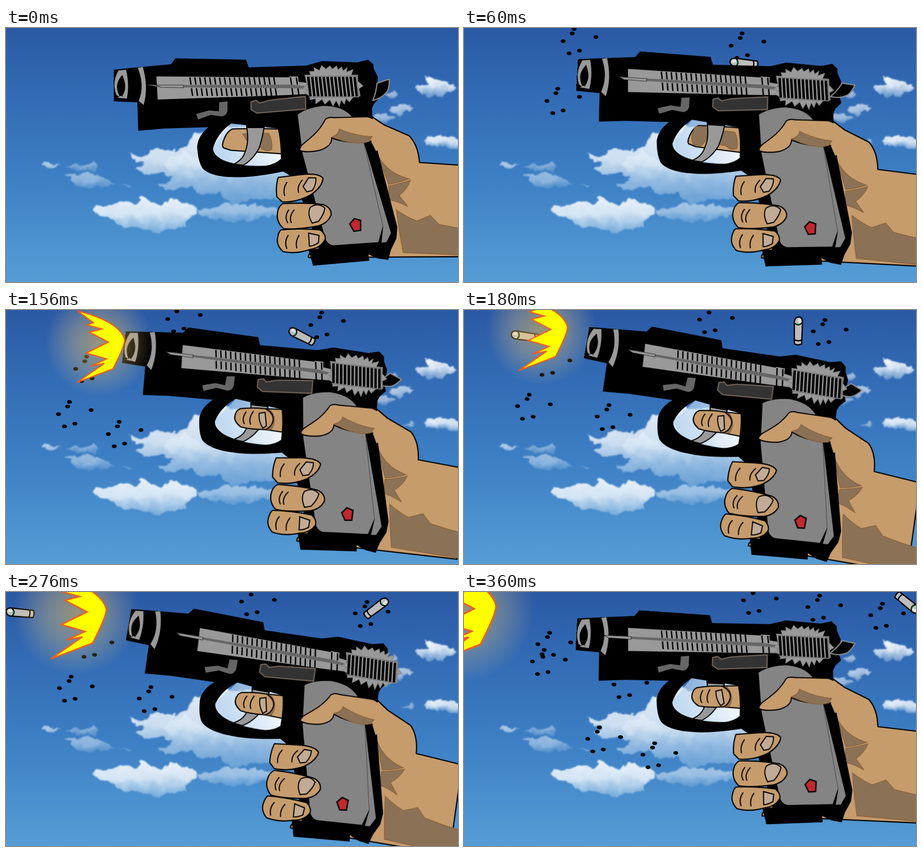
An HTML page for the animation above (0.42 s loop, 998 by 561 pixels).

```html
<!DOCTYPE html>
<html lang="en">
<head>
<meta charset="utf-8">
<title>Recoil loop</title>
<style>
  html, body { margin: 0; width: 100%; height: 100%; overflow: hidden; background: #3c7cc2; }
  svg { display: block; width: 100vw; height: 100vh; }
  .skin { fill: #c69c6d; stroke: #000; stroke-width: 2.6; stroke-linejoin: round; }
  .shade { fill: #8b7257; stroke: #8c6239; stroke-width: 1.8; }
  .nail { fill: #c1ab96; stroke: #000; stroke-width: 2.4; }
  .crease { fill: none; stroke: #000; stroke-width: 2.4; stroke-linecap: round; }
  .metal { fill: #999; }
</style>
</head>
<body>
<svg viewBox="0 0 998 561" preserveAspectRatio="none">
  <defs>
    <linearGradient id="sky" x1="0" y1="0" x2="0" y2="1">
      <stop offset="0" stop-color="#2b59a4"/>
      <stop offset=".25" stop-color="#326ab4"/>
      <stop offset=".6" stop-color="#3d80c5"/>
      <stop offset="1" stop-color="#569dd5"/>
    </linearGradient>
    <linearGradient id="puff" x1="0" y1="0" x2="0" y2="1">
      <stop offset="0" stop-color="#fff" stop-opacity=".95"/>
      <stop offset=".45" stop-color="#f4f9fd" stop-opacity=".85"/>
      <stop offset="1" stop-color="#a9cdea" stop-opacity=".4"/>
    </linearGradient>
    <linearGradient id="haze">
      <stop offset="0" stop-color="#a9cdee" stop-opacity=".6"/>
      <stop offset="1" stop-color="#fff" stop-opacity=".75"/>
    </linearGradient>
    <radialGradient id="glow">
      <stop offset="0" stop-color="#ffc84a" stop-opacity=".5"/>
      <stop offset=".5" stop-color="#ffd070" stop-opacity=".3"/>
      <stop offset="1" stop-color="#ffd890" stop-opacity="0"/>
    </radialGradient>
    <filter id="fluff" x="-10%" y="-20%" width="120%" height="140%">
      <feTurbulence type="fractalNoise" baseFrequency=".045" numOctaves="3" seed="4"/>
      <feDisplacementMap in="SourceGraphic" scale="22" xChannelSelector="R" yChannelSelector="G"/>
      <feGaussianBlur stdDeviation="1.8"/>
    </filter>
    <g id="casing" stroke="#000" stroke-width="2.8" stroke-linejoin="round">
      <path fill="#bdbdbd" d="M-31-1Q-30-9-20-9L29-8Q33 0 29 8L-20 9Q-30 8-31-1Z"/>
      <path fill="#e4e4e4" stroke="none" d="M-26-5L-15-6-16-1-27 1Z"/>
      <path fill="none" d="M-18-8Q-9 0-17 8M20-8Q24 0 20 8"/>
      <path fill="none" stroke="#18a05a" stroke-width="2" d="M-17-5Q-13 0-16 5"/>
    </g>
  </defs>

  <rect width="998" height="561" fill="url(#sky)"/>
  <g id="clouds" fill="url(#puff)" filter="url(#fluff)"></g>
  <g id="dots"></g>
  <use id="shell" href="#casing"/>

  <g id="gun">
    <path class="skin" d="M668 502L815 250 808 196 Q822 205 835 214L890 238Q910 258 913 297L1017 304 1024 505 668 507Z"/>
    <path class="shade" d="M817 272Q837 320 890 333Q864 343 845 345Z"/>
    <path class="shade" d="M845 349Q870 344 893 336Q886 356 868 370L887 394Q866 383 845 379Z"/>
    <path class="shade" d="M862 402Q888 420 907 426L937 414 956 434 998 442 1060 450V503L998 501 877 496Q868 450 862 402Z"/>

    <path fill="url(#haze)" d="M497 211L603 222 610 295 575 306 480 294 455 266Z"/>
    <g id="restFinger">
      <path class="skin" d="M640 280L538 273 496 270 481 265Q475 262 481 247 487 229 500 223 540 221 640 224Z"/>
      <path class="shade" d="M523 234L562 232 580 233Q589 248 587 268 575 276 562 264L540 262Z"/>
    </g>
    <path id="fingerTipShade" class="shade" d="M497 226Q512 222 523 228 527 255 510 268L495 266Q484 250 497 226Z"/>
    <path class="metal" stroke="#000" stroke-width="2.4" d="M531 216L570 218Q567 240 559 265 546 290 524 303L502 301Q524 291 529 270 537 250 531 216Z"/>
    <path d="M533 212L572 213 569 221 532 221Z"/>
    <g id="pullFinger" transform="translate(771 435)rotate(-6.8)translate(-753 -451)">
      <path class="skin" d="M640 272L606 269 572 264Q540 264 518 258 504 247 505 236 507 222 517 218 545 215 573 218L640 221Z"/>
      <path class="shade" stroke="none" d="M577 222Q594 235 588 252L575 264 586 264Q600 242 584 221Z"/>
      <path class="nail" d="M559 228L572 226 575 256 567 261Q557 245 559 228Z"/>
      <path class="crease" d="M530 225Q520 240 526 251M546 224Q535 240 540 252M573 218Q592 228 590 243 586 260 572 264"/>
    </g>

    <path fill-rule="evenodd" d="M238 92L288 87 364 80 374 67 530 70 536 87 663 83 698 73 775 76 799 70 811 80 812 90 821 108 819 140 824 155 812 168 808 178 809 200 815 250 864 440 862 465 850 490 844 512 821 509 800 500 802 514 678 525 668 490 690 487 662 400 632 329 612 317Q570 326 530 329 455 333 434 310 424 295 422 262 424 238 447 219L350 222 292 227 290 164 238 162Z
      M497 211Q466 233 457 266 458 281 480 292 520 308 575 304 596 300 607 289 607 250 600 222L536 215Z"/>
    <path fill="#848484" d="M644 191Q665 176 700 172 747 172 767 200L789 250 832 438 822 473 722 480Q709 477 705 465L655 278Z"/>
    <path fill="#848484" d="M829 474L833 437 850 453 840 473Z"/>
    <path fill="#848484" d="M790 252L850 453 833 440Z"/>
    <path fill="#c1272d" stroke="#000" stroke-width="3" d="M759 433L769 421 783 425 783 447 768 449Z"/>

    <path class="metal" d="M248 94L265 92Q273 125 267 156L246 154 255 149Q266 128 257 104 236 125 252 153L244 148Q233 122 248 94Z"/>
    <path d="M256 104Q270 129 257 150L259 153 249 145Q240 126 256 104Z"/>
    <path class="metal" d="M291 88L302 86Q315 130 304 170L293 161Q307 128 291 88Z"/>
    <path fill="#666" d="M420 190L448 182 470 184 471 164 489 162 489 183Q486 196 474 195L452 192 424 202Z"/>
    <path fill="#333" stroke="#736357" stroke-width="2.6" d="M541 163L552 160 560 166 580 160 604 157 661 151 662 179 554 188 541 180Z"/>

    <g id="hammer">
      <path stroke="#8c8c8c" stroke-width="2.6" stroke-linejoin="round" d="M846 113L819 122Q818 140 810 160 832 155 843 138 847 126 846 113Z"/>
    </g>
    <g id="slide">
      <path class="metal" d="M332 107L625 109 626 107 645 107 646 119 664 121 664 146 600 149 335 158Z"/>
      <path id="slots" stroke="#000" stroke-width="3"/>
      <path fill="#666" d="M310 125L340 126 632 125 664 129 664 134 630 133 340 131Z"/>
      <path fill="#999" stroke="#848484" stroke-width="1.5" d="M660 104L673 104 670 96 681 96 680 88 692 94 697 83 706 91 715 84 720 91 730 84 733 93 741 86 744 95 753 88 751 98 766 92 762 104 776 104 777 118 788 128 779 134 782 150 766 153 758 163 751 155 747 168 740 158 736 173 729 160 722 172 715 158 704 168 698 157 684 167 684 156 671 158 673 150 659 144 666 136 655 134 665 126Z"/>
      <path fill="#999" stroke="#777" stroke-width="2" d="M664 107L774 106 779 152 670 153Z"/>
      <path id="grooves" stroke="#000" stroke-width="5.4"/>
    </g>
    <path id="rod" fill="#999" stroke="#222" stroke-width="1.2" d="M331 126L392 126 392 132 342 131Z"/>

    <path class="skin" stroke="none" style="stroke:none" d="M795 197L820 205 838 260 817 272 806 250Z"/>
    <path class="skin" style="stroke:none" d="M648 268C655 250 690 230 705 202Q711 196 725 198L795 196 812 202 816 240 806 250Q760 256 720 243 720 261 693 270 665 276 650 271Z"/>
    <path class="crease" d="M806 250Q760 258 719 243 720 261 693 270 665 276 650 271 646 268 654 258C675 240 692 228 705 202Q711 196 725 198L795 196 808 196 Q822 206 835 214"/>
    <path class="shade" d="M736 223Q770 238 808 240L802 250Q785 257 758 252 736 248 720 240 734 236 736 223Z"/>

    <path class="skin" d="M601 330L650 324Q690 319 700 332 698 352 672 369 640 386 610 384L598 373Q595 350 601 330Z"/>
    <path class="nail" d="M668 331L656 350 664 362 676 359Q686 345 684 331Z"/>
    <path class="skin" d="M611 388Q660 385 700 390 718 396 718 412 712 430 690 437 640 446 613 443 598 430 599 412 600 395 611 388Z"/>
    <path class="nail" d="M672 396Q690 384 704 398 702 412 690 427L676 431Q664 410 672 396Z"/>
    <path class="skin" d="M607 446Q650 442 694 446 706 455 705 466 696 485 672 489 640 500 612 494 596 480 600 462 602 450 607 446Z"/>
    <path class="nail" d="M668 453L691 458 690 474Q680 481 670 482Z"/>
    <path class="crease" d="M620 341Q611 355 615 370M654 336Q642 350 646 363M624 402Q614 417 622 430M636 402Q624 417 630 430M623 458Q614 472 620 487M647 458Q638 472 642 486"/>
  </g>

  <use id="bullet" href="#casing"/>
  <g id="flash">
    <circle cx="205" cy="72" r="120" fill="url(#glow)"/>
    <path fill="#ff0" stroke="#f15a24" stroke-width="2.6" d="M158 2Q252 26 262 66 262 80 236 130L157 160 217 118 187 124 222 108 177 95 226 71 184 49 212 42 179 33 193 28Z"/>
  </g>
</svg>
<script>
const STEP = 60;
const PIVOT = [771, 435], HAMMER_TIP = [846, 113], FLASH_ROOT = [236, 130];
const $ = id => document.getElementById(id);

// gun: x, y of the pivot and turn; slide and rod: shift along the barrel;
// hammer: tip and turn; shell and bullet: x, y, turn; flash: x, y, scale
const poses = [
  { gun: [771, 435, 0], slide: 0, rod: 0, hammer: [846, 113, 0] },
  { gun: [764, 442, 3.3], slide: 17.5, rod: 0, hammer: [851.6, 114, 24], shell: [618, 78, 6],
    dots: [614, 12, 243, 2, 207, 134] },
  { gun: [753, 451, 6.8], slide: 34.5, rod: 0, hammer: [855, 125, 40], shell: [653, 58, 27], flash: [236, 130, 1],
    dots: [697, 6, 381, -7, 178, 103, 140, 203, 250, 247] },
  { gun: [742, 468, 10], slide: 34, rod: 0, hammer: [855, 125, 40], shell: [738, 46, 91], flash: [202, 103, 1.02],
    bullet: [135, 58, 8], spin: 4, dots: [797, 22, 546, -4, 187, 90, 144, 187, 320, 210] },
  { gun: [742, 468, 10], slide: 62.5, rod: 13, shell: [818, 35, 143], flash: [191, 113, 1.17],
    bullet: [31, 46, 5], spin: 4, dots: [797, 22, 546, -4, 187, 90, 144, 187, 320, 210] },
  { gun: [752, 449, 6.7], slide: 18, rod: -33, hammer: [853, 121, 37], shell: [901, -5, 200], flash: [89, 114, 1.34],
    spin: 4, dots: [711, 4, 850, 21, 569, -11, 189, 90, 177, 128, 284, 175, 225, 295, 348, 330] },
  { gun: [765, 428, 2.9], slide: 19, rod: -33, hammer: [853, 116, 28], shell: [979, 24, 219], flash: [36, 116, 1.34],
    spin: 4, dots: [785, 8, 924, 26, 643, -7, 189, 90, 177, 128, 357, 179, 299, 299, 421, 334] }
];
const cluster = [[0, 0], [-4, 10], [-24, 27], [48, 18], [-11, 54], [12, 48]];

const clouds = [
  ["270 275 302 280 328 264 365 272 398 262 422 236 470 215 600 222 640 300 640 380 560 378 500 388 468 366 430 372 402 352 350 360 336 342 366 336 340 322 310 327 286 310 302 300 276 290", .92],
  ["340 300 400 270 440 300 520 290 500 340 440 330 400 335", .35],
  ["190 392 232 393 255 383 288 390 300 373 335 386 378 378 420 396 426 410 402 424 396 442 350 444 330 458 292 440 242 436 226 415 202 408", .95],
  ["422 402 470 394 500 387 560 394 610 402 610 414 540 424 502 430 440 416", .55],
  ["130 328 190 321 245 346 200 353 160 352", .5],
  ["130 304 165 302 190 294 202 314 170 317", .45],
  ["80 297 100 297 116 304 95 309", .65],
  ["258 345 268 343 279 349", .5],
  ["902 132 926 124 930 107 952 118 986 126 994 135 962 150 936 154 914 140", 1],
  ["840 142 860 138 864 150 846 156", .6],
  ["846 180 866 170 897 176 870 194", .7],
  ["808 192 840 186 859 202 825 212", .6],
  ["920 252 942 236 975 241 1004 248 1004 264 960 267", .95],
  ["866 253 900 246 906 256", .5]
];
$("clouds").innerHTML = clouds.map(([points, opacity]) =>
  `<polygon points="${points}" opacity="${opacity}"/>`).join("");

const strokes = (count, draw) => Array.from({ length: count }, (_, i) => draw(i)).join("");
const slot = x => `M${x} 109l2.5 16M${x + 3.5} 133l2.5 17`;
$("slots").setAttribute("d", strokes(18, i => slot(406 + i * 10.9)) + slot(628) + slot(641));
$("grooves").setAttribute("d", strokes(13, i => `M${667.5 + i * 8.5} 108l5 43`));

function place(id, pose, origin = [0, 0], scale = 1) {
  const el = $(id);
  el.style.display = pose ? "" : "none";
  if (!pose) return;
  const [x, y, turn] = pose;
  el.setAttribute("transform",
    `translate(${x} ${y})rotate(${turn})scale(${scale})translate(${-origin[0]} ${-origin[1]})`);
}

const show = (id, on) => { $(id).style.display = on ? "" : "none"; };

function dotMarkup({ dots = [], spin = 0 }) {
  const spots = cluster.map(([x, y]) =>
    `<ellipse cx="${x}" cy="${y}" rx="5.4" ry="4.1"/>`).join("");
  let markup = "";
  for (let i = 0; i < dots.length; i += 2)
    markup += `<g transform="translate(${dots[i]} ${dots[i + 1]})rotate(${spin})">${spots}</g>`;
  return markup;
}

let shown = -1;
function render(time) {
  const index = Math.floor(time / STEP) % poses.length;
  if (index === shown) return;
  shown = index;
  const pose = poses[index];
  place("gun", pose.gun, PIVOT);
  place("slide", [pose.slide, 0, 0]);
  place("rod", [pose.rod, 0, 0]);
  place("hammer", pose.hammer, HAMMER_TIP);
  place("shell", pose.shell);
  place("bullet", pose.bullet);
  place("flash", pose.flash && [pose.flash[0], pose.flash[1], 0], FLASH_ROOT, pose.flash && pose.flash[2]);
  place("restFinger", index < 2 && [index * 13, 0, 0]);
  place("fingerTipShade", index === 1 && [9, 0, 0]);
  show("pullFinger", index > 1);
  $("dots").innerHTML = dotMarkup(pose);
}

const start = performance.now();
function tick() {
  render(performance.now() - start);
  requestAnimationFrame(tick);
}
render(0);
requestAnimationFrame(tick);
</script>
</body>
</html>
```
